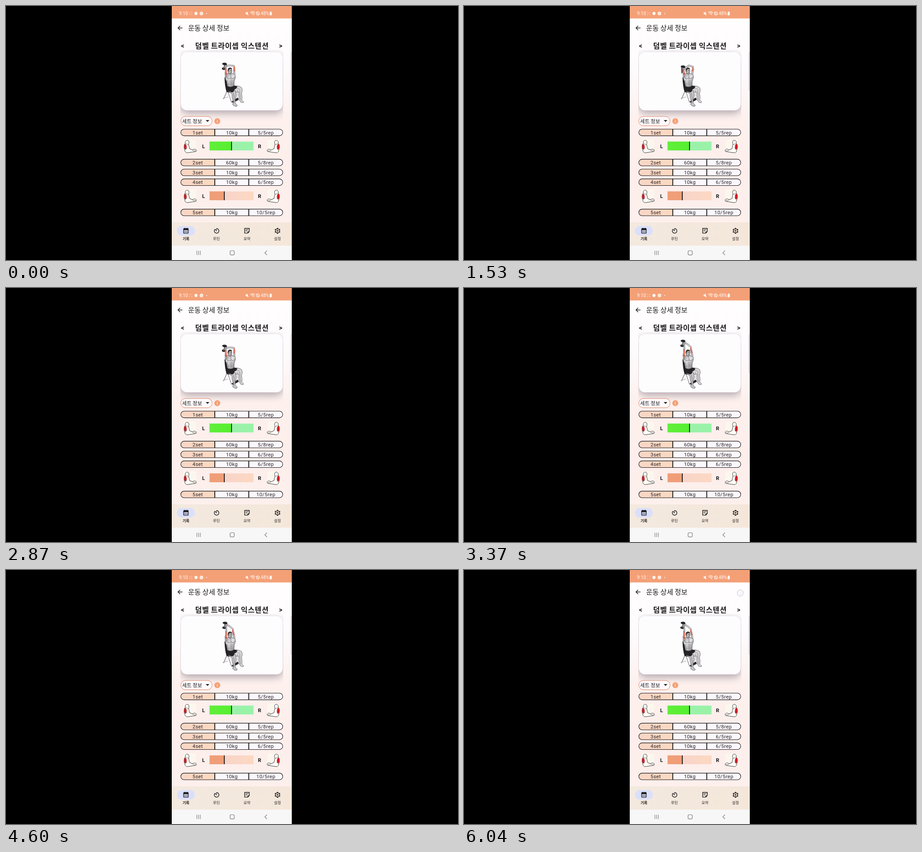
An HTML page with a canvas for the animation above (6.07 s loop, 998 px wide and 561 px high).

```html
<!DOCTYPE html>
<html lang="ko">
<head>
<meta charset="utf-8">
<title>운동 상세 정보</title>
<style>
html, body { margin: 0; width: 100%; height: 100%; overflow: hidden; background: #000; }
canvas { display: block; }
</style>
</head>
<body>
<canvas id="stage" width="998" height="561"></canvas>
<script>
const ctx = document.getElementById('stage').getContext('2d');
const LOOP = 6070;
const KR = '"Noto Sans CJK KR", "Noto Sans CJK", sans-serif';
const LATIN = 'Roboto, sans-serif';
const INK = '#1b1a1c', ORANGE = '#f4a077';

// ---- helpers ----
function text(str, x, base, size, opt = {}) {
  ctx.font = `${opt.weight || 400} ${size}px ${opt.font || KR}`;
  ctx.letterSpacing = (opt.gap || 0) + 'px';
  ctx.textAlign = opt.align || 'left';
  ctx.fillStyle = opt.color || INK;
  ctx.fillText(str, x, base);
  ctx.letterSpacing = '0px';
}
function rect(x, y, w, h, color) {
  ctx.fillStyle = color;
  ctx.fillRect(x, y, w, h);
}
function paint(fill, stroke, width = 1) {
  if (fill) { ctx.fillStyle = fill; ctx.fill(); }
  if (stroke) { ctx.strokeStyle = stroke; ctx.lineWidth = width; ctx.stroke(); }
}
function round(x, y, w, h, r, fill, stroke, width) {
  ctx.beginPath();
  ctx.roundRect(x, y, w, h, r);
  paint(fill, stroke, width);
}
function oval(x, y, rx, ry, fill, stroke, width, turn = 0) {
  ctx.beginPath();
  ctx.ellipse(x, y, rx, ry, turn, 0, Math.PI * 2);
  paint(fill, stroke, width);
}
function line(points, color, width) {
  ctx.beginPath();
  for (let i = 0; i < points.length; i += 2) ctx.lineTo(points[i], points[i + 1]);
  paint(null, color, width);
}
function shape(d, fill, stroke, width = 1) {
  const p = new Path2D(d);
  if (fill) { ctx.fillStyle = fill; ctx.fill(p); }
  if (stroke) { ctx.strokeStyle = stroke; ctx.lineWidth = width; ctx.stroke(p); }
}
function fade(x0, y0, x1, y1, ...stops) {
  const g = ctx.createLinearGradient(x0, y0, x1, y1);
  stops.forEach((c, i) => g.addColorStop(i / (stops.length - 1), c));
  return g;
}
function gear(x, y, r, color, width) {
  for (let i = 0; i < 6; i++) {
    const a = i * Math.PI / 3 + Math.PI / 6, c = Math.cos(a), s = Math.sin(a);
    line([x + c * r * .72, y + s * r * .72, x + c * r, y + s * r], color, width * 1.7);
  }
  oval(x, y, r * .7, r * .7, null, color, width);
  oval(x, y, r * .22, r * .22, null, color, width * .8);
}

// ---- screen parts ----
function statusBar(t) {
  rect(366, 0, 265, 27.5, ORANGE);
  const W = '#fff8f2';
  text('9:10', 382, 20.2, 10.2, { font: LATIN, color: W });
  const crossed = (t % 1740) < 700 || (t % 1740) > 1000;
  for (const sx of [-1, 1]) for (const sy of [-1, 1]) {
    if (crossed) line([408 + sx * 1.2, 16.5 + sy * 1.2, 408 + sx * 3.4, 16.5 + sy * 3.6], W, .8);
    else rect(407.5 + sx * 3, 16 + sy * 3, 1.1, 1.1, W);
  }
  oval(419.5, 16.5, 3.4, 3.4, W);
  gear(431.5, 16.5, 4, W, 1.5);
  oval(443, 16.5, 1.1, 1.1, W);
  shape('M529 15H531L534 12.5V20.5L531 18H529Z', W);
  line([529.5, 12.8, 536, 20], W, .9);
  for (const r of [2.5, 5, 7.4]) {
    ctx.beginPath();
    ctx.arc(544.5, 20, r, -Math.PI * .75, -Math.PI * .25);
    paint(null, W, 1.1);
  }
  line([547, 17, 547, 20.5], W, 1);
  oval(556, 16.5, 3.5, 3.5, null, W, 1.1);
  line([553.6, 14, 558.4, 19], W, 1.1);
  text('48%', 562.3, 20.2, 10, { font: LATIN, color: W });
  round(582.2, 13.2, 4.6, 7.2, 1, W);
  rect(583.4, 12.2, 2.2, 1.2, W);
}

function header() {
  line([389.7, 48.5, 380, 48.5], INK, 1.4);
  line([384.5, 43.7, 379.8, 48.5, 384.5, 53.3], INK, 1.4);
  text('운동 상세 정보', 402, 54.2, 15.3);
  text('덤벨 트라이셉 익스텐션', 417.6, 93.5, 16.2, { weight: 700, gap: .52 });
  text('<', 390, 93, 14.5, { font: LATIN, weight: 700, align: 'center' });
  text('>', 606.5, 93, 14.5, { font: LATIN, weight: 700, align: 'center' });
}

function card() {
  ctx.save();
  ctx.beginPath();
  ctx.rect(385, 97, 227, 160);
  ctx.clip();
  ctx.shadowColor = 'rgba(70,55,75,.42)';
  ctx.shadowBlur = 17;
  ctx.shadowOffsetY = 6;
  round(386, 102, 225, 128.5, 14, '#fdfcff');
  ctx.restore();
  rect(393, 108, 211, 114, '#fefdfe');
  round(628.5, 102, 4, 85, 2, '#eeeaf2', '#cfcbd5', .8);
}

function picker() {
  round(386, 244, 69, 20.5, 10, '#fefafc', '#dd8464', 1);
  text('세트 정보', 388.8, 258.6, 11.3);
  shape('M441 252H449L445 256Z', INK);
  oval(466.5, 254.3, 6.5, 6.5, ORANGE);
  rect(465.9, 253.4, 1.2, 4, '#fff');
  rect(465.9, 251, 1.2, 1.3, '#fff');
}

function setRow(y, cells) {
  ctx.save();
  ctx.beginPath();
  ctx.roundRect(386, y, 225, 14.6, 7.3);
  ctx.clip();
  rect(386, y, 225, 15, '#fbf8fd');
  rect(386, y, 75, 15, fade(386, 0, 461, 0, '#f9d6c5', '#fcd9c1'));
  ctx.restore();
  round(386, y, 225, 14.6, 7.3, null, '#161416', 1.1);
  rect(460.1, y, 1.8, 14.6, '#111');
  rect(535.2, y, 1.8, 14.6, '#111');
  cells.forEach((s, i) => text(s, [423.3, 498.6, 573.8][i], y + 11.5, 11.2,
    { font: LATIN, align: 'center', gap: .38, color: '#272326' }));
}

function arm(x, y, flip) {
  ctx.save();
  ctx.translate(x, y);
  ctx.scale(flip, 1);
  round(0, 0, 28, 30, 4, '#fcf7ee');
  shape('M4 8C3 2 7 1 10 2C13 4 12 8 11 11C12 14 13 17 13 20L20 23C23 20 27 21 28 23C29 26 27 27 24 27L10 29C5 30 3 27 3 24C0 17 1 11 4 8Z', '#fffdf8', '#252022', .9);
  line([4, 9, 11, 11], '#252022', .6);
  shape('M3 10C6 10 7 15 6.5 19C6 22 4 23 3 21C1 17 1 12 3 10Z', '#df1720', '#70151a', .5);
  line([20, 23, 22, 25, 27, 25], '#252022', .7);
  ctx.restore();
}

function balance(y, split, left, right) {
  arm(392, y - 4.5, 1);
  arm(605, y - 4.5, -1);
  text('L', 436, y + 14.2, 11.4, { font: LATIN, weight: 700, align: 'center' });
  text('R', 560, y + 14.2, 11.4, { font: LATIN, weight: 700, align: 'center' });
  rect(449.5, y, 97, 19.5, right);
  rect(449.5, y, split - 449.5, 19.5, left);
  rect(split - .9, y, 1.8, 19.5, '#111');
}

function tabs() {
  rect(366, 478, 265, 51.5, fade(366, 0, 631, 0, '#f3e9df', '#f4e7da'));
  round(377.5, 486, 39.5, 21, 10.5, '#dadffb');
  round(392.2, 491.5, 10.2, 10.4, 1, null, INK, 1.4);
  rect(392, 492, 10.5, 3, INK);
  rect(394, 490, 1.4, 2, INK);
  rect(399.2, 490, 1.4, 2, INK);
  for (let i = 0; i < 6; i++) rect(394 + i % 3 * 2.6, 496.5 + (i / 3 | 0) * 2.3, 1.3, 1.3, INK);

  ctx.beginPath();
  ctx.arc(465, 496.6, 5.1, -Math.PI / 2, Math.PI * 1.27);
  paint(null, INK, 1.4);
  line([465, 491.3, 465, 494], INK, 1.4);
  line([465.3, 497, 461.8, 493.5], INK, 1.6);

  shape('M527 491.3H537.2V498L533.8 501.6H527Z', null, INK, 1.4);
  shape('M533.3 501.8V498H537.5Z', INK);
  line([529, 494.2, 535.2, 494.2], INK, 1.1);
  line([529, 496.8, 532.4, 496.8], INK, 1.1);

  gear(599.5, 496.5, 6.5, INK, 1.4);

  ['기록', '루틴', '요약', '설정'].forEach((s, i) => text(s, 397.3 + i * 67.4, 517.3, 8.3,
    { align: 'center', weight: i ? 500 : 700, color: '#2b2726' }));

  rect(366, 529.5, 265, 31.5, '#f8f7f8');
  for (const x of [421.5, 425.3, 429.1]) line([x, 540.5, x, 550], '#79777a', 1.1);
  round(494.7, 540.5, 9.4, 9.4, 2.8, null, '#79777a', 1.2);
  line([576.2, 540.5, 571.5, 545.2, 576.2, 550], '#79777a', 1.2);
}

// ---- exercise figure ----
// weight position, right elbow, left elbow
const POSES = [
  { w: [484, 134], r: [505.5, 133], l: [484.5, 139] },
  { w: [483, 128], r: [504, 131.5], l: [485, 137] },
  { w: [482.3, 122], r: [502.5, 130.5], l: [485.3, 136] },
  { w: [484, 117], r: [501, 129], l: [486, 135.5] }
];
const STEPS = [[30, 1], [235, 0], [430, 1], [620, 2], [815, 3], [1035, 2], [1310, 1]];
function poseAt(t) {
  const p = t % 1310;
  return POSES[STEPS.find(s => p < s[0])[1]];
}

function limb(points, width, color = '#c9c7c8') {
  line(points, '#555355', width + 1);
  line(points, color, width);
}

function body() {
  line([488, 188, 480.5, 205], '#8d8a8d', 1.7);
  line([479, 204, 490, 201], '#a5a2a5', 1.1);
  line([490, 189, 498, 213], '#8d8a8d', 1.4);
  shape('M482.5 158L487.5 157L491 185L506 188L503 193L487 190Q483 177 482.5 158Z', '#222124');
  shape('M498 211L512 202L514 207L501 214Z', '#29282b');

  // legs
  shape('M499 178Q512 174 520 180Q523 185 520 193Q522 203 520.5 208L525 212Q523 215 518 212L515.5 208Q513 198 514 190L500 191Z', '#d8d6d7', '#4f4d50', .8);
  shape('M491 180Q504 180 507 189Q510 198 506 207L506 215Q512 219 510 221Q506 223 500.5 218L502 211Q498 202 499 194L490 188Z', '#c8c6c8', '#464447', .8);
  line([516, 184, 517, 196, 518, 208], '#848285', .9);
  line([502, 192, 504, 202, 503, 214], '#777578', 1);
  line([506, 181, 515, 183], '#9b989b', 1);
  line([511, 186, 511, 200], '#777578', .7);
  shape('M488.5 176Q497 181 504.5 175.5L511 178Q508 184 504 184Q505 189 499 191L488 187Z', '#242326');

  // torso
  shape('M485 151Q490 148 494 149Q501 148 506 152Q508 158 504 165L503.5 176Q496 181 489 177L487 166Q482 159 485 151Z',
    fade(484, 150, 507, 172, '#a6a4a7', '#e3e1e3', '#939194'), '#49474a', .8);
  shape('M487 157Q492 165 497 158Q502 164 505 157', null, '#666467', .9);
  line([496.5, 152, 497, 174], '#777578', .8);
  for (let i = 0; i < 3; i++) {
    line([491, 165 + i * 3.6, 495.5, 166 + i * 3.5], '#858386', .7);
    line([498, 166 + i * 3.5, 502.5, 164.5 + i * 3.6], '#858386', .7);
  }
  line([488.5, 164, 491, 176], '#626063', .9);
}

function figure(t) {
  const { w, r, l } = poseAt(t), low = w[1] > 130;
  ctx.lineJoin = ctx.lineCap = 'round';
  body();

  // weight behind the head
  const bx = w[0] - 2.3, by = w[1] + (low ? 12 : 10.5);
  if (!low) oval(bx, by, 4, 2.7, '#252427', null, 1, .12);
  line([w[0], w[1], bx, by], '#5f5d60', 2);

  // far arm, head, near arm
  const hx = w[0] + 3, hy = w[1] + 5;
  limb([504, 150, r[0], r[1] + 6], 3.2, '#c4c1c3');
  oval(494.3, 143.5, 4.4, 6.6, '#b5b3b6', '#454346', .8);
  shape('M489.5 143Q489 136 494.5 136Q499 136 499 140Q495 138 492 141L491 146Z', '#39373a');
  line([494, 143, 498, 142.5], '#555356', .8);
  line([495.5, 147, 498, 146.5], '#555356', .7);
  line([492, 149, 495, 151.5, 498, 149], '#5f5d60', .8);
  limb([hx + 1, hy - 1, (hx + r[0]) / 2, (hy + r[1]) / 2 - (low ? 4.5 : 1), r[0] - .5, r[1] + 1], 2.6, '#d0ced0');
  line([r[0], r[1] + 3, r[0] + .5, r[1] + 8, 503.5, 143], '#d96b54', 3);
  line([r[0] + 1, r[1] + 4, r[0] + .5, r[1] + 9], '#f2a18b', 1);
  limb([486, 155, 485.2, 147], 3.4, '#aaa8ab');
  line([485.7, 150, l[0], l[1]], '#d4614a', 3.8);
  line([484.7, 148, l[0] - .3, l[1] + 2], '#f0937b', 1.1);
  limb([l[0] + .7, l[1], hx - 1, hy], 2.4, '#bfbcbe');
  oval(hx - 1, hy - .5, 2.3, 2.5, '#b9b7ba', '#555356', .6);
  oval(w[0] - .3, w[1], low ? 5.2 : 5.3, 2.7, '#232225', null, 1, .08);
  if (low) line([480.5, 136, 481.2, 148], '#353336', 2);
  ctx.lineJoin = 'miter';
  ctx.lineCap = 'butt';
}

function draw(t) {
  rect(0, 0, 998, 561, '#000');
  rect(366, 0, 265, 561, fade(0, 27, 0, 478, '#fffeff', '#fefbfc', '#fdf0ed', '#fdeeeb', '#fcefec'));
  statusBar(t);
  header();
  card();
  figure(t);
  picker();
  setRow(272, ['1set', '10kg', '5/5rep']);
  balance(299.5, 498, fade(450, 0, 498, 0, '#62ee3b', '#55ef2f'), '#9af2a9');
  setRow(338.4, ['2set', '60kg', '5/8rep']);
  setRow(360.2, ['3set', '10kg', '6/5rep']);
  setRow(381.9, ['4set', '10kg', '6/5rep']);
  balance(409.5, 482, '#ef9e78', fade(482, 0, 546, 0, '#f8d4ca', '#fcd8c2'));
  setRow(448.6, ['5set', '10kg', '10/5rep']);
  tabs();
  if (t >= 5990) oval(610, 50.8, 7, 7, 'rgba(245,242,248,.7)', '#cbc8d0', 1);
  rect(631, 0, 367, 561, '#000');
}

function frame() {
  draw(performance.now() % LOOP);
  requestAnimationFrame(frame);
}
frame();
</script>
</body>
</html>
```
